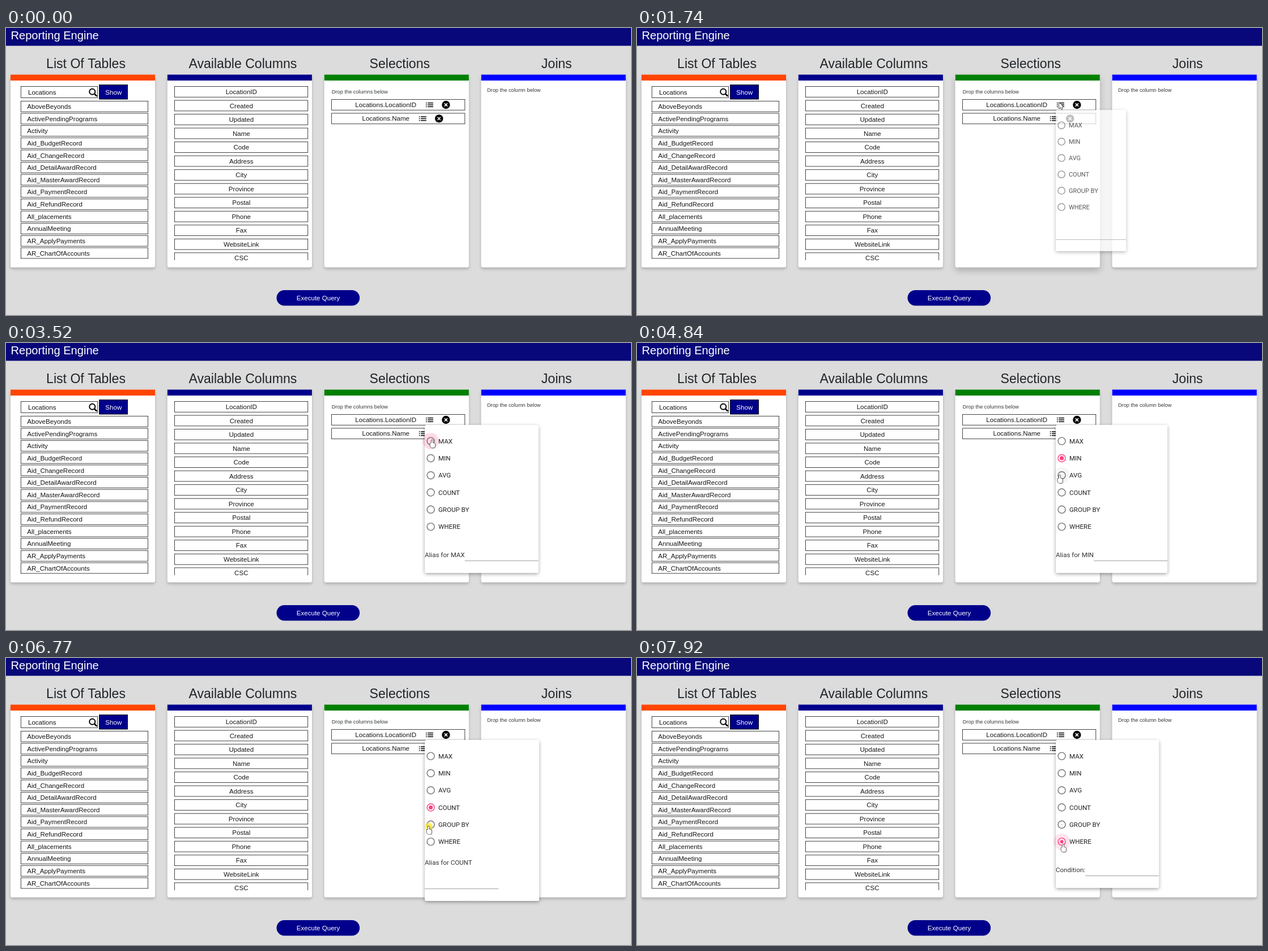
An HTML page with a canvas for the animation above (8000 ms loop, 1103 px wide and 508 px high).

```html
<!DOCTYPE html>
<html lang="en">
<head>
<meta charset="utf-8">
<title>Reporting Engine</title>
<style>
html, body { margin: 0; width: 100%; height: 100%; overflow: hidden; background: #dcdcdc; }
canvas { display: block; }
</style>
</head>
<body>
<canvas id="stage" width="1103" height="508"></canvas>
<script>
const ctx = document.getElementById('stage').getContext('2d');
const LOOP = 8000;
const NAVY = '#00008b', PINK = '#ff4081', INK = '#151515';
const SANS = '"Liberation Sans", Arial, sans-serif';
const ROBOTO = 'Roboto, sans-serif';
const TEXT_SIZE = 11.55;

const TABLES = ['AboveBeyonds', 'ActivePendingPrograms', 'Activity', 'Aid_BudgetRecord',
  'Aid_ChangeRecord', 'Aid_DetailAwardRecord', 'Aid_MasterAwardRecord', 'Aid_PaymentRecord',
  'Aid_RefundRecord', 'All_placements', 'AnnualMeeting', 'AR_ApplyPayments', 'AR_ChartOfAccounts'];
const COLUMNS = ['LocationID', 'Created', 'Updated', 'Name', 'Code', 'Address', 'City',
  'Province', 'Postal', 'Phone', 'Fax', 'WebsiteLink', 'CSC'];
const CARDS = [
  { title: 'List Of Tables', color: '#ff4500' },
  { title: 'Available Columns', color: NAVY },
  { title: 'Selections', color: '#008000' },
  { title: 'Joins', color: '#0000ff' }];

// Each menu option is pressed once, and becomes selected on release.
const OPTIONS = [
  { name: 'MAX', press: 3370 },
  { name: 'MIN', press: 4230 },
  { name: 'AVG', press: 5150 },
  { name: 'COUNT', press: 5980 },
  { name: 'GROUP BY', press: 6770 },
  { name: 'WHERE', press: 7690 }];
const HOLD = 140;
const MENU_PRESS = 1510, MENU_OPEN = 1740, POINTER_IN = 120;

const clamp = v => Math.max(0, Math.min(1, v));
const ramp = (t, a, b) => clamp((t - a) / (b - a));
const mix = (a, b, p) => a + (b - a) * p;
const easeOut = (p, power) => 1 - (1 - p) ** power;
const optionY = i => 173.6 + 30.3 * i;

const MOVES = [
  { start: POINTER_IN, end: 590, x: 742, y: 120 },
  { start: 740, end: 1050, x: 745, y: 132 },
  ...OPTIONS.map(({ press }, i) => ({
    start: i ? OPTIONS[i - 1].press + 230 : 2450,
    end: press - 240,
    x: i % 5 ? 746 : 752,
    y: 171.5 + 31.6 * i
  }))];

const ARROW = new Path2D('M0 0V10.5L2.5 8.2 4.2 12 5.8 11.3 4.2 7.6 7.4 7.4Z');
const HAND = new Path2D();
HAND.roundRect(-1.3, 0, 2.6, 9, 1.3);
HAND.roundRect(-3.6, 5.6, 8.8, 8.4, [2, 2.5, 3, 4]);

function text(str, x, y, { size = TEXT_SIZE, color = INK, align = 'left', family = SANS } = {}) {
  ctx.font = `${size}px ${family}`;
  ctx.fillStyle = color;
  ctx.textAlign = align;
  ctx.fillText(str, x, y);
}

function box(x, y, w, h) {
  ctx.strokeStyle = '#222';
  ctx.lineWidth = .85;
  ctx.strokeRect(x, y, w, h);
}

function disc(x, y, r, color) {
  ctx.fillStyle = color;
  ctx.beginPath();
  ctx.arc(x, y, r, 0, 7);
  ctx.fill();
}

function line(x1, y1, x2, y2, width, color) {
  ctx.strokeStyle = color;
  ctx.lineWidth = width;
  ctx.beginPath();
  ctx.moveTo(x1, y1);
  ctx.lineTo(x2, y2);
  ctx.stroke();
}

// White rounded panel whose shadow falls only outside its own outline.
function panel(x, y, w, h, shadow, blur, dy) {
  const shape = new Path2D(), outside = new Path2D();
  shape.roundRect(x, y, w, h, 3);
  outside.rect(0, 0, 1103, 508);
  outside.addPath(shape);
  ctx.fillStyle = '#fff';
  ctx.save();
  ctx.clip(outside, 'evenodd');
  ctx.shadowColor = `rgba(0,0,0,${shadow})`;
  ctx.shadowBlur = blur;
  ctx.shadowOffsetY = dy;
  ctx.fill(shape);
  ctx.restore();
  ctx.fill(shape);
}

function card({ title, color }, i, lift) {
  const x = 8 + 276.9 * i;
  panel(x, 82.5, 255, 341, .22, mix(5.8, 11.6, lift), mix(2.9, 5.8, lift));
  ctx.fillStyle = color;
  ctx.fillRect(x, 82.5, 255, 10.5);
  text(title, x + 133, 71, { size: 23.1, color: '#212529', align: 'center' });
}

function searchRow() {
  box(26.3, 103.5, 135.3, 20);
  text('Locations', 39, 118);
  ctx.strokeStyle = '#000';
  ctx.lineWidth = 2;
  ctx.beginPath();
  ctx.arc(152.3, 112.8, 5, 0, 7);
  ctx.stroke();
  line(156, 116.5, 160.3, 120.8, 2.6, '#000');
  ctx.fillStyle = NAVY;
  ctx.fillRect(164.5, 100.5, 50.3, 25.7);
  ctx.strokeStyle = '#000';
  ctx.lineWidth = 1;
  ctx.strokeRect(164.7, 100.7, 49.8, 25.2);
  text('Show', 189.8, 117.5, { color: '#fff', align: 'center' });
}

function selection(label, y, textX, iconX) {
  box(574.6, y - 9.5, 235.2, 18.8);
  text(label, textX, y + 4);
  for (let i = -1; i <= 1; i++) {
    const ly = y + i * 3.3;
    line(iconX, ly, iconX + 1.7, ly, 1.5, '#000');
    line(iconX + 3.2, ly, iconX + 13, ly, 1.5, '#000');
  }
  const cx = iconX + 35.4, arm = 2.6;
  disc(cx, y, 7.2, '#000');
  line(cx - arm, y - arm, cx + arm, y + arm, 1.5, '#fff');
  line(cx + arm, y - arm, cx - arm, y + arm, 1.5, '#fff');
}

function page(t) {
  ctx.fillStyle = '#dcdcdc';
  ctx.fillRect(0, 0, 1103, 508);
  ctx.fillStyle = '#08087a';
  ctx.fillRect(0, 0, 1103, 31.5);
  text('Reporting Engine', 8.5, 20, { size: 20.1, color: '#fff' });

  const hoverLift = ramp(t, 320, 560) - ramp(t, 1840, 2100);
  CARDS.forEach((c, i) => card(c, i, c.title === 'Selections' ? hoverLift : 0));

  searchRow();
  TABLES.forEach((name, i) => {
    const y = 129.4 + 21.63 * i;
    box(26.3, y, 224.3, 18.9);
    text(name, 37.3, y + 13.6);
  });

  ctx.save();
  ctx.beginPath();
  ctx.rect(285, 93, 255, 318);
  ctx.clip();
  COLUMNS.forEach((name, i) => {
    const y = 103.5 + 24.53 * i;
    box(297.5, y, 235.2, 18.8);
    text(name, 415.3, y + 13.5, { align: 'center' });
  });
  ctx.restore();

  const hint = { size: 9.25, color: '#33373a' };
  text('Drop the columns below', 574.8, 116, hint);
  text('Drop the column below', 848.9, 113, hint);
  selection('Locations.LocationID', 136, 616.3, 741);
  selection('Locations.Name', 160.4, 628.5, 728.8);

  ctx.fillStyle = NAVY;
  ctx.beginPath();
  ctx.roundRect(477.5, 464, 146.7, 27.4, 13.7);
  ctx.fill();
  text('Execute Query', 551, 482, { color: '#fff', align: 'center' });
}

function pointerAt(t) {
  return MOVES.reduce((at, move) => {
    const p = easeOut(ramp(t, move.start, move.end), 2);
    return { x: mix(at.x, move.x, p), y: mix(at.y, move.y, p) };
  }, { x: 900, y: 508 });
}

function hoveredOption(t, pointer) {
  if (t < MENU_OPEN) return -1;
  return OPTIONS.findIndex((_, i) => Math.abs(pointer.y - optionY(i)) < 11);
}

// A dot grows when its option is released and shrinks when the next one is.
function dotSize(t, i) {
  const grown = ({ press }) => easeOut(ramp(t, press + HOLD, press + HOLD + 280), 4);
  const next = OPTIONS[i + 1];
  return grown(OPTIONS[i]) - (next ? grown(next) : 0);
}

function radio(t, i, hover) {
  const { name, press } = OPTIONS[i];
  const x = 749.6, y = optionY(i), release = press + HOLD;
  if (t >= press) {
    const alpha = mix(.03, .2, ramp(t, press, release)) * (1 - ramp(t, release, release + 300));
    disc(x, y, 14.4, `rgba(255,64,129,${alpha})`);
  } else if (hover) {
    disc(x, y, 14.4, 'rgba(0,0,0,.04)');
  }
  const dot = dotSize(t, i);
  ctx.strokeStyle = dot > .5 ? PINK : 'rgba(0,0,0,.54)';
  ctx.lineWidth = 1.45;
  ctx.beginPath();
  ctx.arc(x, y, 6.5, 0, 7);
  ctx.stroke();
  if (dot > 0) disc(x, y, 3.6 * dot, PINK);
  text(name, 763, y + 4.2, { color: '#212121', family: ROBOTO });
}

function menuLabel(t) {
  const picked = OPTIONS.filter(({ press }) => t >= press + HOLD).pop();
  if (!picked) return '';
  return picked.name === 'WHERE' ? 'Condition:' : 'Alias for ' + picked.name;
}

function menu(t, hover) {
  if (t < MENU_OPEN) return;
  const left = 739, top = 145, field = 130, maxWidth = 202;
  const open = ramp(t, MENU_OPEN, MENU_OPEN + 100);
  const scale = mix(.954, 1, open);

  ctx.save();
  ctx.globalAlpha = mix(.75, 1, open);
  ctx.translate(left, top);
  ctx.scale(scale, scale);
  ctx.translate(-left, -top);

  const label = menuLabel(t);
  ctx.font = `${TEXT_SIZE}px ${ROBOTO}`;
  const labelWidth = ctx.measureText(label).width;
  const wraps = labelWidth + field > maxWidth;
  panel(left, top, wraps ? maxWidth : labelWidth + field, wraps ? 285 : 262, .36, 6, 2);

  OPTIONS.forEach((_, i) => radio(t, i, hover === i));
  text(label, left, wraps ? 366 : 379, { color: '#333', family: ROBOTO });
  const fieldX = wraps ? left : left + labelWidth, fieldY = wraps ? 408.5 : 385.5;
  line(fieldX, fieldY, fieldX + field, fieldY, 1, '#a0a0a0');
  ctx.restore();
}

function cursor(shape, { x, y }) {
  ctx.save();
  ctx.translate(x, y);
  ctx.strokeStyle = '#222';
  ctx.lineWidth = 1.4;
  ctx.lineJoin = 'round';
  ctx.stroke(shape);
  ctx.fillStyle = '#fff';
  ctx.fill(shape);
  ctx.restore();
}

function render(t) {
  const pointer = pointerAt(t), hover = hoveredOption(t, pointer);
  page(t);
  menu(t, hover);
  if (t < POINTER_IN) return;
  const pressed = (t >= MENU_PRESS && t < MENU_OPEN) ||
    OPTIONS.some(({ press }) => t >= press && t < press + HOLD);
  if (pressed) disc(pointer.x, pointer.y + .5, 6.6, 'rgba(255,232,0,.65)');
  cursor(hover >= 0 ? HAND : ARROW, pointer);
}

function tick(now) {
  render(now % LOOP);
  requestAnimationFrame(tick);
}
render(0);
requestAnimationFrame(tick);
</script>
</body>
</html>
```
